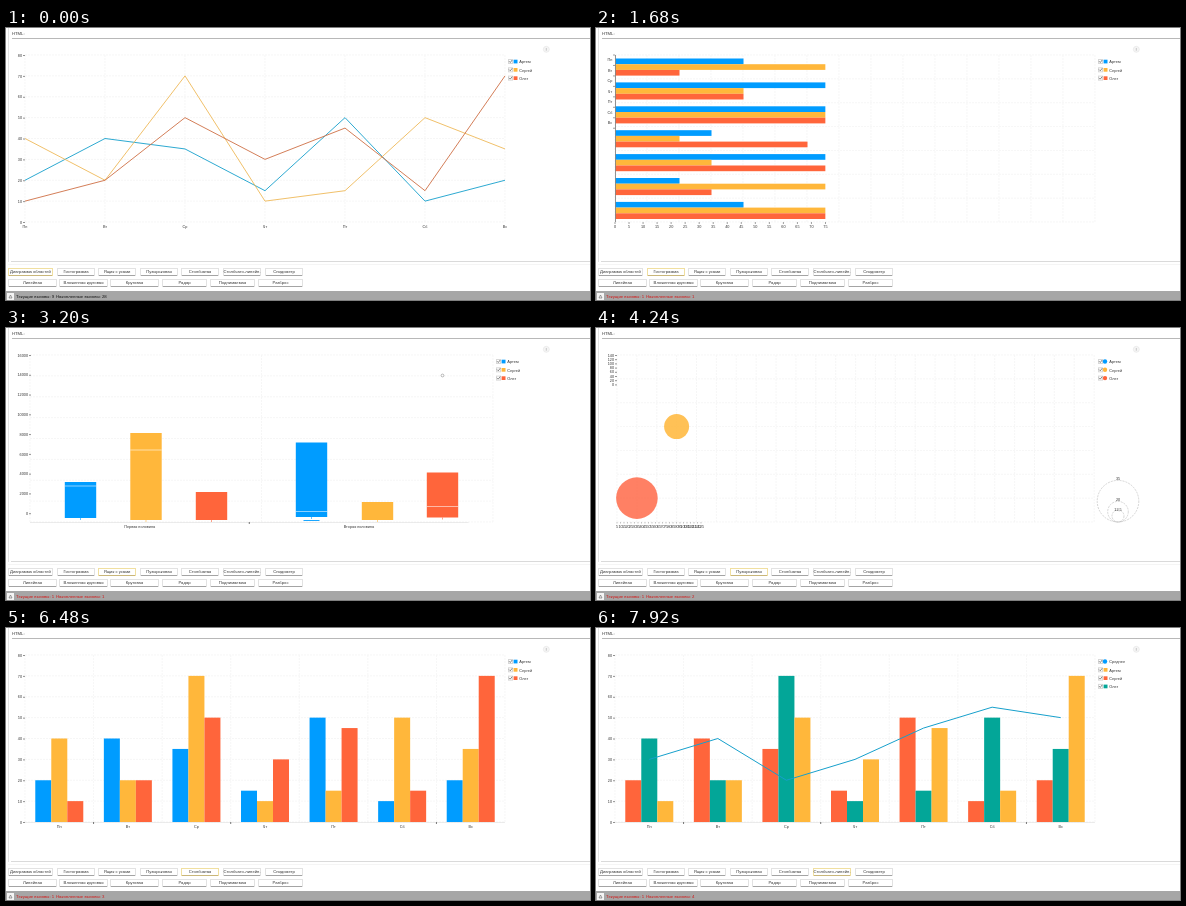
These frames come from a looping animation (584 by 272 pixels, 8000 ms). An HTML page with a canvas:

```html
<!DOCTYPE html>
<html lang="ru">
<head>
<meta charset="utf-8">
<title>Диаграммы</title>
<style>
html, body { margin: 0; width: 100%; height: 100%; overflow: hidden; background: #fff; }
canvas { display: block; width: 584px; height: 272px; }
</style>
</head>
<body>
<canvas></canvas>
<script>
const LOOP = 8000, STEP = 80, REVEAL = 640;
const TOP = 27, BOTTOM = 194, HEIGHT = BOTTOM - TOP;
const BLUE = '#009cff', ORANGE = '#ffb73b', RED = '#ff653b', TEAL = '#03a698';
const STROKES = ['#16a0cc', '#efb95a', '#cf7046'];
const DAYS = ['Пн', 'Вт', 'Ср', 'Чт', 'Пт', 'Сб', 'Вс'];
const PEOPLE = ['Артем', 'Сергей', 'Олег'];
const SERIES = [
  [20, 40, 35, 15, 50, 10, 20],
  [40, 20, 70, 10, 15, 50, 35],
  [10, 20, 50, 30, 45, 15, 70]
];
const AVERAGE = [30, 40, 20, 30, 45, 55, 50];
const FONT = '"Liberation Sans", Arial, sans-serif';

const canvas = document.querySelector('canvas');
const ctx = canvas.getContext('2d');
const ratio = window.devicePixelRatio || 1;
canvas.width = 584 * ratio;
canvas.height = 272 * ratio;

const range = (n, f) => Array.from({ length: n }, (_, i) => f(i));

function rect(x, y, w, h, fill, stroke) {
  if (fill) { ctx.fillStyle = fill; ctx.fillRect(x, y, w, h); }
  if (stroke) { ctx.strokeStyle = stroke; ctx.lineWidth = 1; ctx.strokeRect(x + .5, y + .5, w - 1, h - 1); }
}

function path(points, stroke, width = 1) {
  ctx.beginPath();
  points.forEach(([x, y]) => ctx.lineTo(x, y));
  ctx.strokeStyle = stroke;
  ctx.lineWidth = width;
  ctx.stroke();
}

function circle(x, y, r, fill, stroke, width = .6) {
  ctx.beginPath();
  ctx.arc(x, y, r, 0, 7);
  if (fill) { ctx.fillStyle = fill; ctx.fill(); }
  if (stroke) { ctx.strokeStyle = stroke; ctx.lineWidth = width; ctx.stroke(); }
}

function text(s, x, y, size = 3.8, align = 'center', color = '#333') {
  ctx.font = `${size}px ${FONT}`;
  ctx.textAlign = align;
  ctx.textBaseline = 'middle';
  ctx.fillStyle = color;
  ctx.fillText(s, x, y);
}

function grid(xs, ys, left, right) {
  ctx.setLineDash([2, 1]);
  xs.forEach(x => path([[x, TOP], [x, BOTTOM]], '#f3f3f3', .7));
  ys.forEach(y => path([[left, y], [right, y]], '#f3f3f3', .7));
  ctx.setLineDash([]);
}

// Axis labels spread out from the top left corner while the plot is revealed.
function yAxis(max, step, left, p) {
  for (let v = 0; v <= max; v += step) {
    const y = TOP + HEIGHT * (1 - v / max) * p;
    text(v, left - 3, y + .6, 3.8, 'right');
    path([[left - 2, y + .5], [left, y + .5]], '#777', .8);
  }
}

function xAxis(labels, positions, left, p) {
  labels.forEach((s, i) => text(s, left + (positions[i] - left) * p, 199));
}

function plot(left, width, p, draw) {
  ctx.save();
  ctx.beginPath();
  ctx.rect(left - 1, 15, (width + 2) * p, 181);
  ctx.clip();
  draw();
  ctx.restore();
}

function legend(names, colors, marks, x = 503) {
  names.forEach((name, i) => {
    const y = 34 + i * 8.3, color = colors[i];
    rect(x - 1, y - 3, 5, 5, '#fff', '#d8d8d8');
    path([[x, y - .8], [x + 1.3, y + .5], [x + 3.2, y - 2]], '#555', .7);
    if (marks[i] === 'dot') circle(x + 6, y - .5, 2.2, color);
    else rect(x + 4.6, y - 2.3, 3.9, 3.7, color);
    text(name, x + 10.3, y + .3, 3.9, 'left');
  });
}

const valueY = v => BOTTOM - v / 80 * HEIGHT;
const tens = range(9, i => valueY(i * 10));
const same = mark => range(4, () => mark);

function lines(p, filled) {
  const xs = DAYS.map((_, i) => 19 + i * 80);
  grid(xs, tens, 19, 499);
  yAxis(80, 10, 19, p);
  xAxis(DAYS, xs, 19, p);
  plot(19, 480, p, () => SERIES.forEach((values, s) => {
    const points = values.map((v, i) => [xs[i], valueY(v)]);
    if (filled) {
      ctx.beginPath();
      [[19, BOTTOM], ...points, [499, BOTTOM]].forEach(([x, y]) => ctx.lineTo(x, y));
      ctx.globalAlpha = .33;
      ctx.fillStyle = [BLUE, ORANGE, RED][s];
      ctx.fill();
      ctx.globalAlpha = 1;
    }
    path(points, STROKES[s], filled ? .7 : .9);
  }));
  legend(PEOPLE, [BLUE, ORANGE, RED], same('box'));
}

function bars(p) {
  const row = HEIGHT / 7;
  grid(range(16, i => 19 + i * 32), range(8, i => TOP + i * row), 19, 499);
  plot(19, 480, p, () => SERIES.forEach((values, s) => values.forEach((v, i) =>
    rect(19.5, TOP + 3.5 + i * 23.9 + s * 5.7, v * 6.4, 5.7, [BLUE, ORANGE, RED][s]))));
  path([[19.5, TOP], [19.5, BOTTOM]], '#777', .8);
  DAYS.forEach((d, i) => text(d, 14, TOP + (i + .5) * row * p, 3.8));
  range(8, i => path([[17, TOP + i * row * p], [19, TOP + i * row * p]], '#777', .7));
  range(16, i => {
    const x = 19 + i * 32 * p;
    path([[x, BOTTOM], [x, BOTTOM + 2]], '#777', .7);
    text(i * 5, x, 199);
  });
  legend(PEOPLE, [BLUE, ORANGE, RED], same('box'));
}

// x centre, top, bottom, median
const BOXES = [
  [74.5, 154, 190, 158], [140, 105, 192, 122], [205.5, 164, 192, 0],
  [305.5, 114.5, 189, 183.5], [371.5, 174, 192, 0], [436.5, 144.5, 189.5, 178.5]
];

function boxes(p, t) {
  grid([24, 255.5, 487], range(9, i => TOP + i * HEIGHT / 8), 24, 487);
  yAxis(16000, 2000, 25, p);
  xAxis(['Первая половина', 'Вторая половина'], [139.8, 371.2], 24, p);
  path([[24, BOTTOM + .5], [24 + 463 * p, BOTTOM + .5]], '#e4e4e4', .7);
  const tick = 24 + 231.5 * p;
  path([[tick, BOTTOM], [tick, BOTTOM + 2]], '#555', .8);
  plot(24, 463, p, () => BOXES.forEach(([x, y, end, median], i) => {
    const color = [BLUE, ORANGE, RED][i % 3];
    path([[x, end], [x, end + 2]], color, .6);
    rect(x - 15.7, y, 31.4, end - y, color);
    if (median) path([[x - 15.7, median], [x + 15.7, median]], '#ffffffb0', .8);
    if (i === 3) path([[x - 8, 192.5], [x + 8, 192.5]], color, .9);
  }));
  legend(PEOPLE, [BLUE, ORANGE, RED], same('box'), 491);
  if (t > 2900 && t < 3600) circle(436.5, 47.5, 1.4, '#fff', '#999', .7);
}

// x, y, radius, series
const BUBBLES = [
  [160, 146.3, 4.2, 0], [319, 110.6, 12.5, 0], [478.3, 39.2, 16.6, 0],
  [80.6, 98.6, 12.5, 1], [398.6, 158.2, 16.6, 1],
  [40.9, 170.1, 20.8, 2], [200, 122.4, 8.4, 2]
];

function bubbles(p) {
  const xs = range(25, i => 21 + i * 19.88);
  grid(xs, range(8, i => TOP + i * HEIGHT / 7), 21, 498);
  yAxis(140, 20, 21, p);
  xAxis(xs.map((_, i) => 5 + i * 5), xs, 21, p);
  xs.forEach(x => {
    const tick = 21 + (x - 21) * p;
    path([[tick, BOTTOM], [tick, BOTTOM + 1.5]], '#aaa', .7);
  });
  plot(20, 480, p, () => {
    ctx.globalAlpha = .86;
    BUBBLES.forEach(([x, y, r, s]) => circle(x, y, r, [BLUE, ORANGE, '#ff6c4b'][s]));
    ctx.globalAlpha = 1;
  });
  legend(PEOPLE, [BLUE, ORANGE, RED], same('dot'));
  [[20.8, 35, 150.5], [10.3, 20, 171.5], [6, '12,5', 181.5]].forEach(([r, label, y]) => {
    ctx.setLineDash([2, 1]);
    circle(522, BOTTOM - r, r, null, '#bbb', .6);
    ctx.setLineDash([]);
    text(label, 522, y);
  });
}

function columns(p, combo) {
  const slot = 480 / 7;
  const xs = DAYS.map((_, i) => 19 + (i + .5) * slot);
  const colors = combo ? [RED, TEAL, ORANGE] : [BLUE, ORANGE, RED];
  grid(range(8, i => 19 + i * slot), tens, 19, 499);
  yAxis(80, 10, 19, p);
  xAxis(DAYS, xs, 19, p);
  path([[19, BOTTOM + .5], [19 + 480 * p, BOTTOM + .5]], '#e4e4e4', .7);
  [1, 3, 6].forEach(i => {
    const x = 19 + i * slot * p;
    path([[x, BOTTOM], [x, BOTTOM + 2]], '#555', .8);
  });
  plot(19, 480, p, () => {
    SERIES.forEach((values, s) => values.forEach((v, i) =>
      rect(xs[i] - 24 + s * 16, valueY(v), 16, BOTTOM - valueY(v), colors[s])));
    if (combo) path(AVERAGE.map((v, i) => [xs[i], valueY(v)]), STROKES[0], 1);
  });
  if (combo) legend(['Среднее', ...PEOPLE], [BLUE, ORANGE, RED, TEAL], ['dot', 'box', 'box', 'box']);
  else legend(PEOPLE, colors, same('box'));
}

// start, chart, focused button, counter
const SCENES = [
  [-1000, p => lines(p, false), 0, 28],
  [240, p => lines(p, true), 0, 0],
  [1568, bars, 1, 1],
  [2800, boxes, 2, 1],
  [4200, bubbles, 3, 2],
  [5760, p => columns(p, false), 4, 3],
  [7080, p => columns(p, true), 5, 4]
];

const BUTTONS = [
  ['Диаграмма областей', 'Гистограмма', 'Ящик с усами', 'Пузырьковая', 'Столбчатая', 'Столбчато-линейн.', 'Спидометр'],
  ['Линейная', 'Вложенная круговая', 'Круговая', 'Радар', 'Поднимаемая', 'Разброс']
];
const EDGES = [[2, 51, 92, 134, 175, 217, 259], [2, 53, 104, 156, 204, 252]];
const WIDTHS = [[45, 38, 38, 38, 38, 38, 38], [49, 49, 49, 45, 45, 45]];

function button(name, x, y, w, active) {
  rect(x, y, w, 8, '#fff', active ? '#f0dfa0' : '#e2e2e2');
  rect(x + 1, y + 7, w - 2, 1, active ? '#c9b67a' : '#a4a4a4');
  text(name, x + w / 2, y + 4.2, 4.2);
}

function chrome(t, focus, count) {
  text('HTML:', 6, 5.5, 4.2, 'left');
  rect(6, 10, 578, 1, '#b8b8b8');
  rect(2, 0, 1, 234, '#e2e2e2');
  rect(5, 233, 579, 1, '#dadada');
  rect(2, 236, 582, 1, '#f5f5f5');

  circle(540.3, 21.3, 3, '#f5f5f5', '#e4e4e4');
  path([[540.3, 20], [540.3, 22.7]], '#aaa', .6);

  BUTTONS.forEach((names, r) => names.forEach((name, i) =>
    button(name, EDGES[r][i], r ? 251 : 240, WIDTHS[r][i], r === 0 && i === focus)));

  if (t >= 720 && t < 1200) {
    rect(17, 251, 45, 8, '#fff6da');
    text('Диаграмма областей', 39.5, 255.2, 4.2);
  }

  rect(0, 263, 584, 9, '#a6a6a6');
  rect(1, 265, 7, 7, '#f4f4f4');
  path([[3, 270], [4.5, 267], [6, 270], [3, 270]], '#666', .6);
  const first = count === 28, color = first ? '#111' : '#d41414';
  text(`Текущие вызовы: ${first ? 9 : 1}`, 10, 268.6, 4.3, 'left', color);
  text(`Накопленные вызовы: ${count}`, 50, 268.6, 4.3, 'left', color);
}

function render(now) {
  const t = Math.floor((now % LOOP) / STEP) * STEP;
  const [start, chart, focus, count] = SCENES.filter(scene => scene[0] <= t).pop();
  const progress = 1 - (1 - Math.min(1, (t - start) / REVEAL)) ** 3;
  ctx.setTransform(ratio, 0, 0, ratio, 0, 0);
  rect(0, 0, 584, 272, '#fff');
  chart(progress, t);
  chrome(t, focus, count);
}

let origin;
function tick(now) {
  origin ??= now;
  render(now - origin);
  requestAnimationFrame(tick);
}
render(0);
requestAnimationFrame(tick);
</script>
</body>
</html>
```
